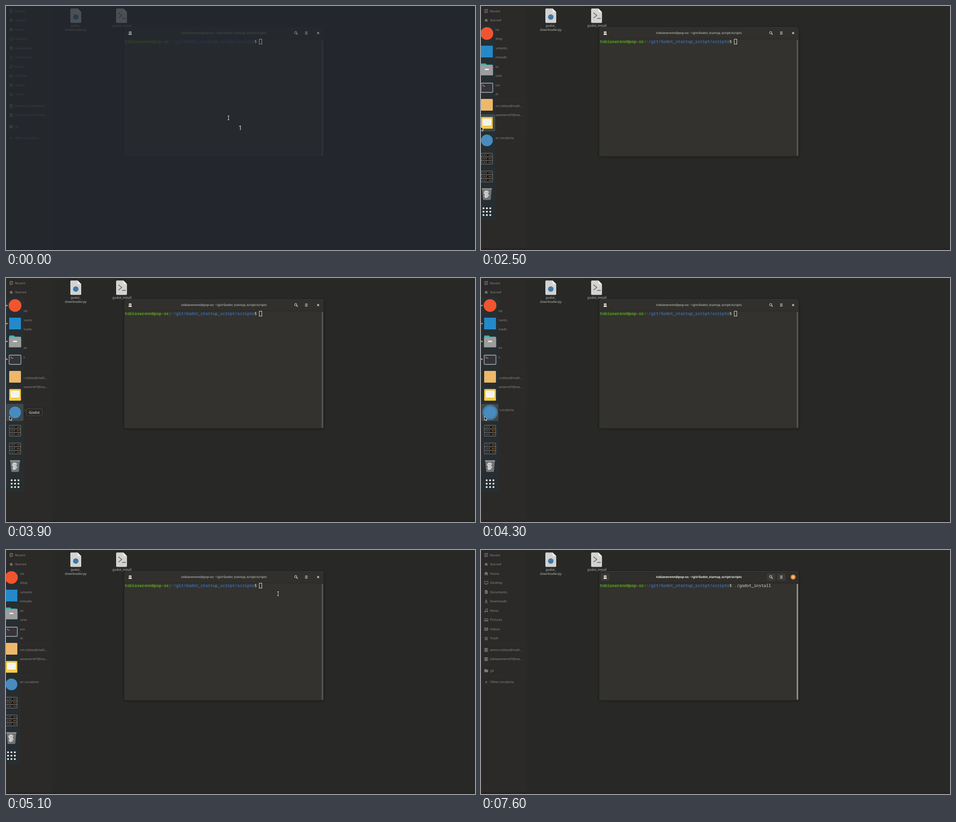
Animation, 1035 px wide and 541 px high, one loop 8 s. Source, as an HTML page:

```html
<!DOCTYPE html>
<html lang="en">
<head>
<meta charset="utf-8">
<title>Desktop terminal session</title>
<style>
html, body { margin: 0; width: 100%; height: 100%; overflow: hidden; background: #282826; }
svg { display: block; width: 100%; height: 100%; }
text { font: 7px "Noto Sans", "Open Sans", sans-serif; text-rendering: geometricPrecision; white-space: pre; }
.side text { fill: #8b8a86; }
.icons { fill: #7c7b78; }
.icons .ln { fill: none; stroke: #7c7b78; stroke-width: 1; }
.label text { fill: #bdbcb9; text-anchor: middle; }
.mono text { font: 9px "Noto Sans Mono", "DejaVu Sans Mono", monospace; fill: #d6d9d0; }
.mono .b { font-weight: 700; }
.title { font-size: 6.75px; font-weight: 700; text-anchor: middle; }

/* One loop is 8 s, so 1.25% is 100 ms */
.t { animation: 8s step-end infinite; }
.veil { animation-name: veil; }
.glow { animation-name: glow; }
.hollow { animation-name: hollow; }
.block { animation-name: block; }
.focus { animation-name: focus; }
.dot { animation-name: dot; }
.slash { animation-name: slash; }
.name { animation-name: name; }
.dock { animation-name: dock; }
.hover { animation-name: hover; }
.tip { animation-name: tip; }
.launch { animation-name: launch; transform-box: fill-box; transform-origin: center; }
.ptr { animation-name: ptr; }
.beam { animation-name: beam; }
.arrow { animation-name: arrow; }

@keyframes veil { 0% { opacity: 1 } 6.25% { opacity: 0 } }
@keyframes glow { 0% { opacity: .62 } 6.25% { opacity: 1 } }
@keyframes hollow { 0% { opacity: 1 } 68.75% { opacity: 0 } }
@keyframes block {
  0% { opacity: 0; transform: none }
  68.75% { opacity: 1; transform: none }
  81.25% { opacity: 0; transform: none }
  85% { opacity: 1; transform: translateX(5.4px) }
  87.5% { opacity: 1; transform: translateX(10.8px) }
  93.75% { opacity: 1; transform: translateX(86.4px) }
  95% { opacity: 0; transform: translateX(86.4px) }
}
@keyframes focus { 0% { opacity: 0 } 71.25% { opacity: .55 } 72.5% { opacity: 1 } }
@keyframes dot { 0% { opacity: 0 } 85% { opacity: 1 } }
@keyframes slash { 0% { opacity: 0 } 87.5% { opacity: 1 } }
@keyframes name { 0% { opacity: 0 } 93.75% { opacity: 1 } }
@keyframes dock {
  0% { transform: translateX(-40px) }
  30% { transform: translateX(-23px) }
  31.25% { transform: translateX(-7px) }
  32.5% { transform: none }
  63.75% { transform: translateX(-8px) }
  65% { transform: translateX(-25px) }
  66.25% { transform: translateX(-40px) }
}
@keyframes hover {
  0% { opacity: 1; transform: none }
  36.25% { opacity: 1; transform: translateY(39px) }
  58.75% { opacity: 0; transform: translateY(39px) }
}
@keyframes tip {
  0% { opacity: 0 }
  37.5% { opacity: .5 }
  38.75% { opacity: 1 }
  41.25% { opacity: 0 }
  47.5% { opacity: .5 }
  48.75% { opacity: 1 }
  50% { opacity: 0 }
}
@keyframes launch {
  0%, 45%, 57.5% { opacity: 0; transform: none }
  41.25%, 50%, 53.75% { opacity: .75; transform: scale(1.3) }
  42.5%, 51.25%, 55% { opacity: .45; transform: scale(2) }
  43.75%, 52.5%, 56.25% { opacity: .16; transform: scale(2.7) }
}
@keyframes ptr {
  0% { transform: translate(491px, 248px) }
  11.25% { transform: translate(462px, 247px) }
  12.5% { transform: translate(420px, 240px) }
  13.75% { transform: translate(378px, 230px) }
  15% { transform: translate(350px, 226px) }
  20% { transform: translate(331px, 226px) }
  21.25% { transform: translate(264px, 222px) }
  22.5% { transform: translate(150px, 226px) }
  23.75% { transform: translate(66px, 245px) }
  27.5% { transform: translate(34px, 252px) }
  28.75% { transform: translate(8px, 262px) }
  30% { transform: translate(0, 266px) }
  31.25% { transform: translate(-1px, 267px) }
  35% { transform: translate(2px, 276px) }
  36.25% { transform: translate(4px, 288px) }
  37.5% { transform: translate(6px, 299px) }
  38.75% { transform: translate(7px, 306px) }
  58.75% { transform: translate(240px, 230px) }
  60% { transform: translate(614.5px, 114.5px) }
  61.25% { transform: translate(612px, 109px) }
  62.5% { transform: translate(606px, 102px) }
  63.75% { transform: translate(600.5px, 97px) }
}
@keyframes beam { 0% { opacity: 1 } 22.5% { opacity: 0 } 60% { opacity: 1 } 82.5% { opacity: 0 } }
@keyframes arrow { 0% { opacity: 0 } 22.5% { opacity: 1 } 60% { opacity: 0 } }
</style>
</head>
<body>
<svg viewBox="0 0 1035 541" xmlns="http://www.w3.org/2000/svg">
  <defs>
    <filter id="soft" x="-10%" y="-10%" width="120%" height="120%"><feGaussianBlur stdDeviation="2"/></filter>
    <g id="disk">
      <path d="M-4-4h8v2.2h-8zM-4-1.1h8v2.2h-8zM-4 1.8h8v2.2h-8z"/>
      <path d="M2-3.3h1v.8h-1zM2-.4h1v.8h-1zM2 2.5h1v.8h-1z" fill="#2b2a28"/>
    </g>
    <g id="page">
      <path d="M-10-16H4l8 8V14q0 2-2 2H-10q-2 0-2-2V-14q0-2 2-2z" fill="#d3d3d1"/>
      <path d="M4-16v6q0 2 2 2h6z" fill="#f0f0ee"/>
    </g>
    <g id="rack">
      <rect x="-13" y="-12.5" width="26" height="25" rx="1.5" fill="#7d7e7d"/>
      <g id="unit">
        <rect x="-12" y="-11.3" width="24" height="6.6" rx=".6" fill="#161616"/>
        <path d="M-10-6.7l2.2-2.8M-6.200-6.700l2.200-2.800M-2.400-6.700l2.200-2.800" stroke="#858685" stroke-width="1.300"/>
        <path d="M4-8h7" stroke="#dd9a4c" stroke-width="1.300" stroke-dasharray="1.600 1"/>
      </g>
      <use href="#unit" y="8"/>
      <use href="#unit" y="16"/>
    </g>
  </defs>

  <!-- File manager -->
  <rect width="1035" height="541" fill="#282826"/>
  <rect width="101" height="541" fill="#2b2a28"/>
  <path d="M0 208.5h101M0 254.5h101M0 279.5h101" stroke="#2e2d2b"/>
  <rect y="538" width="1035" height="3" fill="#232321"/>

  <g class="icons">
    <g transform="translate(11.5 11)"><path class="ln" d="M-3-3.5h6v3.5M-3-3.5v7h6"/><circle class="ln" cx="1" cy=".5" r="2.4"/></g>
    <path transform="translate(11.5 31.5)" d="M0-4.2l1.2 2.9 3.1.2-2.4 2 .8 3.1L0 2.3-2.7 4l.8-3.1-2.4-2 3.1-.2z"/>
    <path transform="translate(11.5 52)" d="M0-4L4.5.2H3.2V4H1V1H-1V4H-3.2V.2H-4.5z"/>
    <g transform="translate(11.5 72.5)"><rect class="ln" x="-3.7" y="-3" width="7.4" height="5.4"/><path d="M-2 3.2h4v1h-4z"/></g>
    <path transform="translate(11.5 93)" d="M-3-4H1.2L3.2-2V4H-3zM-1.7-.8v.8h3.5v-.8zM-1.7 1.2v.8h3.5v-.8z" fill-rule="evenodd"/>
    <path transform="translate(11.5 113.5)" d="M-.8-4H.8V-.4H3L0 2.6-3-.4H-.8zM-3.5 3.2h7v1h-7z"/>
    <g transform="translate(11.5 134)"><path class="ln" d="M-1.3 2.5V-3.3L3-3.8V1.8"/><circle cx="-2.5" cy="2.6" r="1.6"/><circle cx="1.8" cy="2" r="1.6"/></g>
    <g transform="translate(11.5 155)"><rect class="ln" x="-3.7" y="-2.8" width="7.4" height="5.6"/><path d="M-2.8 2l1.9-3 1.4 1.6L1.6-.8 2.8 2z"/></g>
    <g transform="translate(11.5 175.5)"><rect class="ln" x="-3.5" y="-3" width="7" height="6"/><path class="ln" d="M-1.5-3v6M1.5-3v6M-3.5 0h7"/></g>
    <g transform="translate(11.5 196)"><path class="ln" d="M-4-2h8M-2.8-1l.4 4.4h4.8L2.8-1M-.9-.5v3M.9-.5v3M-1-3h2.5"/></g>
    <use href="#disk" x="11.5" y="221.5"/>
    <use href="#disk" x="11.5" y="242"/>
    <path transform="translate(11.5 267.5)" d="M-4-3.5h3.4l1 1.3H4V3.5H-4z"/>
    <path transform="translate(11.5 293)" class="ln" d="M-2.7 0h5.4M0-2.7v5.4"/>
  </g>
  <g class="side">
    <text x="20" y="13.5">Recent</text>
    <text x="20" y="34">Starred</text>
    <text x="20" y="54.5">Home</text>
    <text x="20" y="75">Desktop</text>
    <text x="20" y="95.5">Documents</text>
    <text x="20" y="116">Downloads</text>
    <text x="20" y="136.5">Music</text>
    <text x="20" y="157">Pictures</text>
    <text x="20" y="177.5">Videos</text>
    <text x="20" y="198">Trash</text>
    <text x="20" y="223.5">wrenn.tobias@maili...</text>
    <text x="20" y="244">tobiaswrenn47@ma...</text>
    <text x="20" y="269.5">git</text>
    <text x="20" y="295">Other Locations</text>
  </g>

  <use href="#page" x="154" y="21.5"/>
  <circle cx="154" cy="24.5" r="6" fill="#3f78a8"/>
  <use href="#page" x="255" y="21.5"/>
  <path d="M248 15l7.5 6-7.5 6M256 27.5h8.5" fill="none" stroke="#5b5b59" stroke-width="1.5"/>
  <g class="label">
    <text x="154" y="46">godot_</text>
    <text x="154" y="55">downloader.py</text>
    <text x="256" y="46">godot_install</text>
  </g>

  <!-- Terminal window -->
  <rect x="260" y="48" width="442" height="287" rx="4" fill="#161615" opacity=".5" filter="url(#soft)"/>
  <path d="M261 333V51q0-4 4-4H697q4 0 4 4V333z" fill="#33322e"/>
  <path d="M261 73V51q0-4 4-4H697q4 0 4 4V73z" fill="#31302d"/>
  <path d="M264 47.5H698" stroke="#3a3936"/>
  <path d="M261 73h440" stroke="#282724"/>
  <rect x="696.7" y="75" width="3" height="257" rx="1.5" fill="#595855"/>
  <text class="title" x="481" y="62.2" fill="#a09f9b">tobiaswrenn@pop-os: ~/git/Godot_startup_script/scripts</text>

  <g class="t focus">
    <path d="M261 73V51q0-4 4-4H697q4 0 4 4V73z" fill="#2f2e2b"/>
    <path d="M264 47.5H698" stroke="#42413d"/>
    <path d="M261 73h440" stroke="#232220"/>
    <g fill="#3b3a37">
      <rect x="265" y="52" width="19" height="16" rx="2"/>
      <rect x="631" y="52" width="18.5" height="16" rx="2"/>
      <rect x="653.5" y="52" width="18.5" height="16" rx="2"/>
    </g>
    <rect x="696.7" y="75" width="3" height="257" rx="1.5" fill="#92918d"/>
    <text class="title" x="481" y="62.2" fill="#f3f2ef">tobiaswrenn@pop-os: ~/git/Godot_startup_script/scripts</text>
    <circle cx="688.8" cy="60" r="5.5" fill="#ee8a33"/>
  </g>

  <g class="mono">
    <text x="262" y="82"><tspan class="b" fill="#58a317">tobiaswrenn@pop-os</tspan>:<tspan class="b" fill="#3a69a8">~/git/Godot_startup_script/scripts</tspan></text>
  </g>

  <rect class="t veil" width="1035" height="541" fill="#23272f" fill-opacity=".77"/>

  <g class="t glow">
    <g fill="none" stroke="#efeeeb">
      <path d="M270 63.5h8"/>
      <circle cx="639.3" cy="59" r="2.5"/>
      <path d="M641.2 61l2.5 2.5" stroke-width="1.2"/>
      <path d="M660 57.5h5.5M660 60h5.5M660 62.5h5.5"/>
      <path d="M686.7 57.9l4.2 4.2M690.9 57.9l-4.2 4.2" stroke-width="1.2"/>
    </g>
    <rect x="271.3" y="56.5" width="5.4" height="6.5" fill="#efeeeb"/>
    <path d="M272.3 60h3.4M274 58.3v3.4" stroke="#33322e"/>
    <g class="mono">
      <text x="548.2" y="82">$</text>
      <text class="t dot" x="559" y="82">.</text>
      <text class="t slash" x="564.4" y="82">/</text>
      <text class="t name" x="569.8" y="82">godot_install</text>
    </g>
    <rect class="t hollow" x="559" y="73.5" width="5.5" height="11" fill="none" stroke="#e4e4e0"/>
    <rect class="t block" x="558.8" y="73.3" width="5.7" height="11.2" fill="#f0f0ed"/>
  </g>
  <text class="t veil" x="517" y="275" text-anchor="middle" fill="#dcdcdc" style="font-size:14px">1</text>

  <!-- Dock -->
  <g class="t dock">
    <rect y="42" width="39" height="432.5" fill="#272e31"/>
    <rect class="t hover" x="1" y="240" width="37.5" height="38" rx="2" fill="#3f474b"/>
    <g fill="#f3b97d">
      <circle cx="2" cy="61" r="1.5"/><circle cx="2" cy="101" r="1.5"/>
      <circle cx="2" cy="140.5" r="1.5"/><circle cx="2" cy="180" r="1.5"/>
    </g>
    <circle cx="20" cy="61" r="14" fill="#f1552f"/>
    <rect x="7" y="88" width="26" height="26" fill="#2489ca"/>
    <g transform="translate(20 141)">
      <path d="M-13-12q0-1.5 1.5-1.5h9l2 2.5H11.5q1.5 0 1.5 1.5V0H-13z" fill="#43b3ae"/>
      <rect x="-13.5" y="-9.5" width="27" height="22.5" rx="1.5" fill="#9b9e9d"/>
      <rect x="-4.5" y="-2" width="9" height="3" rx="1" fill="#e9ebea"/>
      <path d="M-13 12.5h26" stroke="#7c7f7e"/>
    </g>
    <g transform="translate(20 181)">
      <rect x="-13" y="-10" width="26" height="20.5" rx="1.5" fill="#343438" stroke="#b9bbbb" stroke-width="1.3"/>
      <path d="M-9.5-6.5l2 1.5-2 1.5M-7-3h3" fill="none" stroke="#dededc" stroke-width=".9"/>
    </g>
    <rect x="7" y="206" width="26" height="26" rx="1.5" fill="#edb869"/>
    <g transform="translate(20 259)">
      <rect x="-13" y="-13" width="26" height="26" rx="2" fill="#efc02c"/>
      <rect x="-10" y="-9.5" width="20" height="16" rx="1" fill="#f6f5ee"/>
      <path d="M-9.500-9L0-1.500 9.500-9M-9.500 6l6.500-7.500M9.500 6L3-1.500" fill="none" stroke="#e2e0d4" stroke-width=".7"/>
      <path d="M-13 6.500h6l2 2H5l2-2h6v4.500q0 2-2 2H-11q-2 0-2-2z" fill="#f6cf45"/>
    </g>
    <circle cx="20" cy="298" r="13" fill="#478cbf"/>
    <use href="#rack" x="20" y="338.5"/>
    <use href="#rack" x="20" y="378"/>
    <g transform="translate(20 417)">
      <path d="M-10.5-12h21l-2 23.5q-.2 1.500-2 1.500h-13q-1.800 0-2-1.500z" fill="#717474"/>
      <path d="M-11-13h22v3h-22z" fill="#8d9090"/>
      <path d="M-5-7l5-1 5 3-3 4 3 3-3 5-5 2-3-4 2-4-3-3z" fill="#d0d2d1"/>
      <path d="M-4-4l4 2 3-3M-2 4l3-2 2 3" fill="none" stroke="#929595"/>
    </g>
    <path d="M12.5 448.5h15.2M12.5 456h15.2M12.5 463.5h15.2" stroke="#f5f5f5" stroke-width="4.2" stroke-linecap="round" stroke-dasharray="0 7.5"/>
  </g>
  <circle class="t launch" cx="20" cy="298" r="13" fill="#478cbf"/>
  <g class="t tip">
    <rect x="41" y="287" width="42" height="22" rx="5" fill="#1b1b1a" opacity=".3"/>
    <rect x="44.5" y="289.5" width="36" height="16.5" rx="2.5" fill="#292928" stroke="#4a4a48"/>
    <text x="62.5" y="300.5" text-anchor="middle" fill="#f0f0ee" style="font-size:8px">Godot</text>
  </g>

  <!-- Pointer -->
  <g class="t ptr">
    <g class="t beam" fill="none" stroke-linecap="square">
      <path d="M-1.5-4.5h3M-1.5 4.5h3M0-4v8" stroke="#161616" stroke-width="2.6"/>
      <path d="M-1.5-4.5h3M-1.5 4.5h3M0-4v8" stroke="#f4f4f4" stroke-width="1.1"/>
    </g>
    <path class="t arrow" d="M.5.5V9.5L2.6 7.6 4.1 11 5.6 10.3 4.2 7.1H7z" fill="#191919" stroke="#f2f2f2" stroke-width=".9"/>
  </g>
</svg>
</body>
</html>
```
